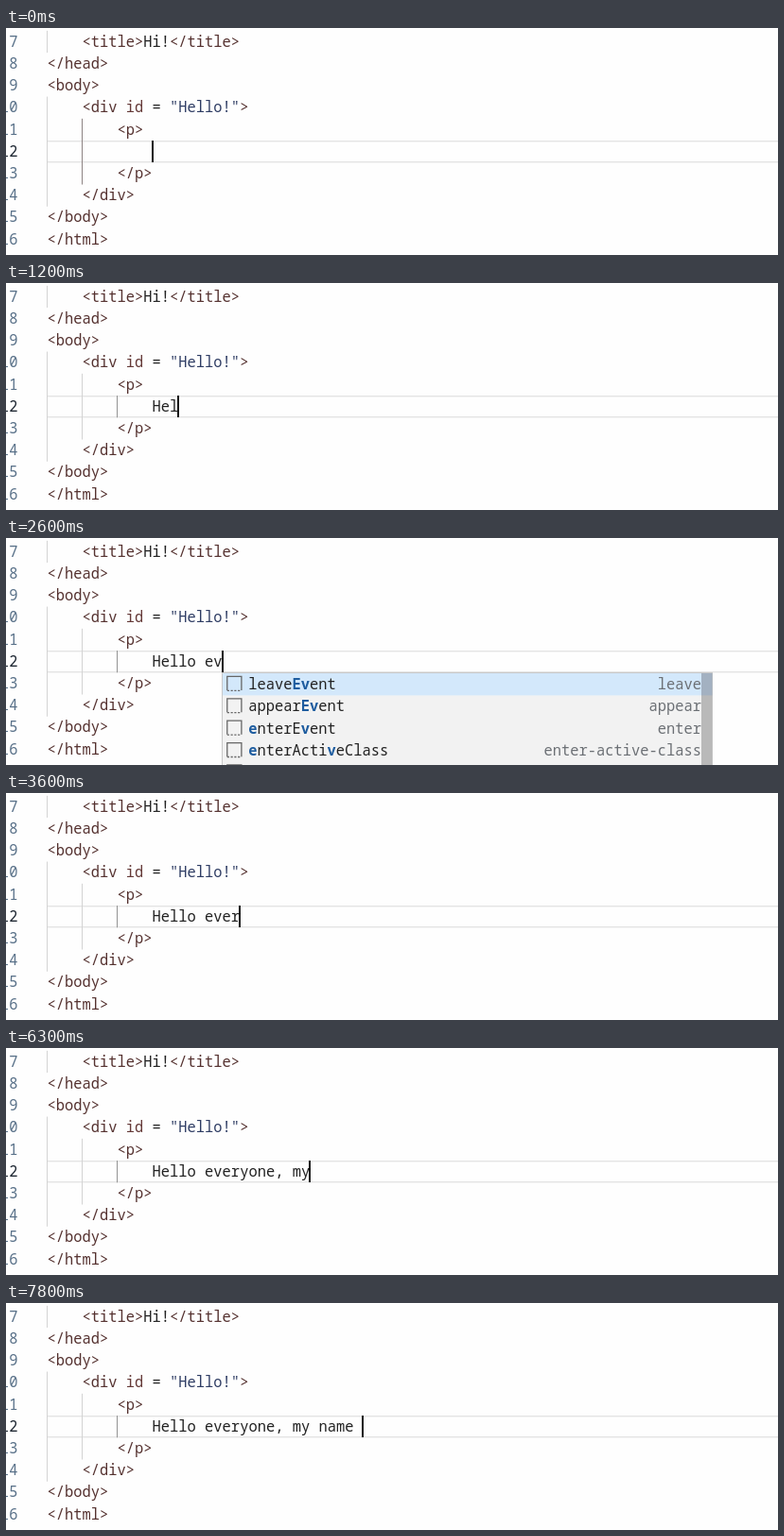
These frames come from a looping animation (816x240 px, 8 s). An HTML page:

```html
<!DOCTYPE html>
<html lang="en">
<head>
<meta charset="utf-8">
<title>Typing in an editor</title>
<style>
  html, body { margin: 0; width: 100%; height: 100%; overflow: hidden; background: #fefefe; }
  svg { display: block; width: 816px; height: 240px; }
  text {
    font: 15.43px "Noto Sans Mono", "DejaVu Sans Mono", monospace;
    font-variant-ligatures: none;
    white-space: pre;
    fill: #222;
  }
  .tag { fill: #553230; }
  .attr { fill: #653a38; }
  .str { fill: #2f3d64; }
  .num { fill: #587088; text-anchor: end; }
  .now { fill: #1c2530; }
  .hit { fill: #1d5c9f; font-weight: 700; }
  .detail { fill: #6c7075; text-anchor: end; }
  .icon { fill: none; stroke: #666; stroke-width: 1.2; }
</style>
</head>
<body>
<svg id="stage" viewBox="0 0 816 240"></svg>
<script>
const LOOP = 8000, CHAR = 9.258, LEFT = 43.5, PITCH = 23.23, FIRST = 7, ACTIVE = 12;
const MESSAGE = "Hello everyone, my name ";

// Time in ms at which each character of the message appears.
const KEYS = [100, 900, 1100, 1400, 1600, 1900, 2200, 2400, 2700, 3200, 3700, 4000,
  4600, 4700, 5000, 5100, 6000, 6300, 6500, 6700, 7000, 7200, 7600, 7700];
const BLINK = [5700, 6000];

// Each line: number, indent column, [class, text] parts.
const LINES = [
  [7, 4, ["tag", "<title>"], ["", "Hi!"], ["tag", "</title>"]],
  [8, 0, ["tag", "</head>"]],
  [9, 0, ["tag", "<body>"]],
  [10, 4, ["tag", "<div "], ["attr", "id"], ["", " = "], ["str", '"Hello!"'], ["tag", ">"]],
  [11, 8, ["tag", "<p>"]],
  [12, 12],
  [13, 8, ["tag", "</p>"]],
  [14, 4, ["tag", "</div>"]],
  [15, 0, ["tag", "</body>"]],
  [16, 0, ["tag", "</html>"]]
];

// Suggestions: stars wrap the matched letters, the part after the bar is the detail.
// Emmet entries show their detail only on the selected first row.
const emmet = (...names) => names.map((n, i) => n + (i ? "|" : "|Emmet Abbreviation"));
const POPUPS = [
  { from: 300, to: 900, items: emmet("*h*1", "*h*2", "*h*3", "*h*4", "*h*5") },
  { from: 1700, to: 1900, items: emmet("*Hello*") },
  { from: 2500, to: 2700, snippets: 0, items: ["leave*Ev*ent|leave", "appear*Ev*ent|appear",
    "*e*nterE*v*ent|enter", "*e*nterActi*v*eClass|enter-active-class", "|"] },
  { from: 2700, to: 3200, snippets: 0, items: ["leave*Eve*nt|leave", "appear*Eve*nt|appear",
    "enter*Eve*nt|enter", "*e*nterActi*ve*Class|enter-active-class", "|"] },
  { from: 6150, to: 6300, items: emmet("*m*ain", "*m*ap", "*m*ark", "*m*enu", "*m*eta") },
  { from: 6900, to: 7000, snippets: 3,
    items: [...emmet("*n*av", "*n*oframes", "*n*oscript"), "*n*uxt|nuxt", "|"] },
  { from: 7000, to: 7200, items: emmet("*na*v") }
];

const stage = document.getElementById("stage");
const esc = s => s.replace(/&/g, "&amp;").replace(/</g, "&lt;");
const colX = col => LEFT + col * CHAR;
const base = line => 19.6 + (line - FIRST) * PITCH;
const rect = (x, y, w, h, fill, more = "") =>
  `<rect x="${x}" y="${y}" width="${w}" height="${h}" fill="${fill}" ${more}/>`;
const span = (cls, s) => `<tspan class="${cls}">${esc(s)}</tspan>`;
const text = (x, y, inner, cls = "") => `<text x="${x}" y="${y}" class="${cls}">${inner}</text>`;

function guide(col, from, to, color) {
  const top = base(from) - 16.7;
  return rect(Math.floor(colX(col)), top, 1, (to - from + 1) * PITCH, color);
}

function codeLine([n, col, ...parts]) {
  const cls = n === ACTIVE ? "num now" : "num";
  return text(12.6, base(n), n, cls) +
    text(colX(col), base(n), parts.map(p => span(...p)).join(""));
}

function icon(x, y, snippet) {
  const shape = snippet
    ? '<path d="M1 14.5V1H15V14.5"/><path d="M1 14.8H15" stroke-dasharray="2 1.5"/>'
    : '<path d="M14.5 4l-3 3-2.2-.6-.6-2.2 3-3C8.5 .3 5.8 3 6.8 6.2L1.6 11.6C.2 13.4 2.6 15.6 4.2 14.2L9.6 9C12.8 10 15.6 7.2 14.5 4Z"/>';
  return `<g class="icon" transform="translate(${x} ${y}) scale(1.08)">${shape}</g>`;
}

function popup({ items, snippets = items.length }, x) {
  const top = 142.5, row = 23.4, width = 518, many = items.length > 1;
  let out = rect(x, top, width, items.length * row + 1, "#f2f2f2", 'stroke="#c8c8c8"');
  out += rect(x + 0.5, top + 0.5, width - 1, row, "#d3e8fb");
  items.forEach((item, i) => {
    const [label, detail] = item.split("|"), y = top + i * row;
    const inner = label.split("*").map((s, k) => span(k % 2 ? "hit" : "", s)).join("");
    out += icon(x + 4.2, y + 2.8, i >= snippets);
    out += text(x + 27.7, y + 17.3, inner);
    out += text(x + 506.5, y + 17.3, detail, "detail");
  });
  if (many) {
    out += rect(x + 506.5, top + 0.5, 11.5, items.length * row, "#b9b9b9");
    out += rect(x + 506.5, top + 0.5, 11.5, row, "#a3b1c1");
  }
  return out;
}

const border = rect(44, 119, 772, 1.4, "#e4e4e4") + rect(44, 141, 772, 1.4, "#e4e4e4");
const code = LINES.map(codeLine).join("");
const outer = guide(0, 7, 7, "#d3d3d3") + guide(0, 10, 14, "#d3d3d3");

function draw(t) {
  const typed = KEYS.filter(k => k <= t).length;
  const caret = colX(12 + typed);
  const open = POPUPS.find(p => t >= p.from && t < p.to);
  const guides = typed
    ? guide(4, 11, 13, "#d3d3d3") + guide(8, 12, 12, "#939393")
    : guide(4, 11, 13, "#8d8383");
  let out = rect(0, 0, 816, 240, "#fefefe") + border + outer + guides + code;
  out += text(colX(12), base(ACTIVE), esc(MESSAGE.slice(0, typed)));
  if (t < BLINK[0] || t >= BLINK[1]) out += rect(Math.round(caret - 1), 119, 2, 23, "#111");
  if (open) out += popup(open, Math.floor(caret) + 0.5);
  return out;
}

const start = performance.now();
let shown = "";
function tick() {
  const next = draw((performance.now() - start) % LOOP);
  if (next !== shown) stage.innerHTML = shown = next;
  requestAnimationFrame(tick);
}
tick();
</script>
</body>
</html>
```
